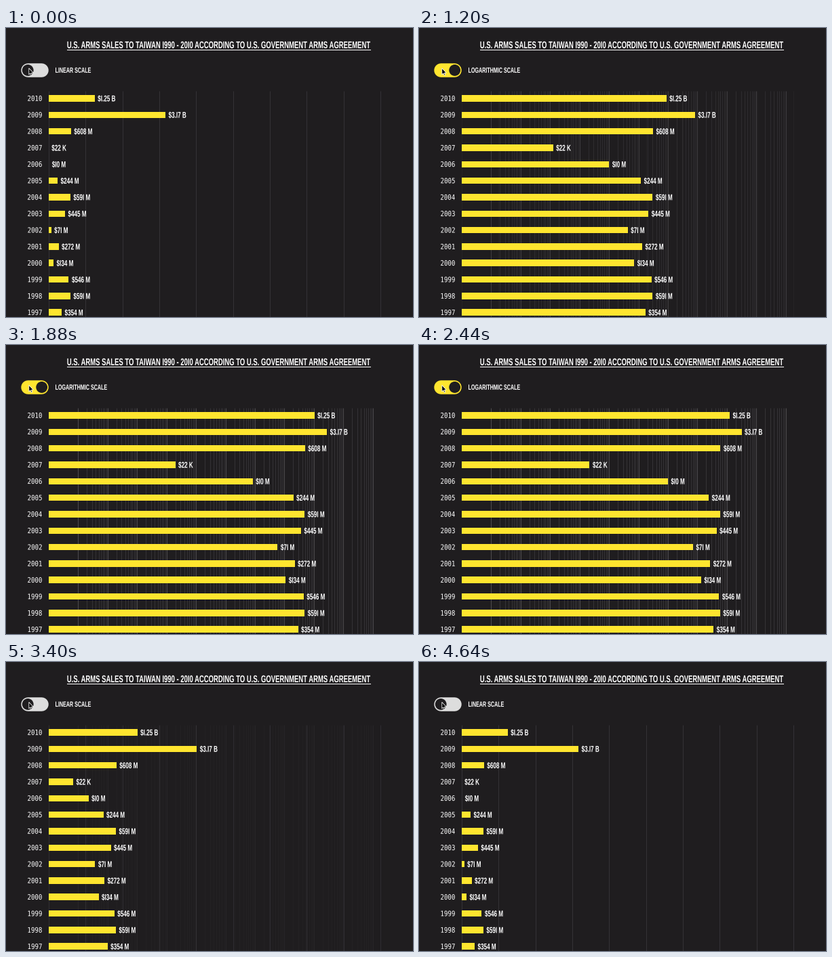
A matplotlib script for the animation above (4.68 s loop, 600 px wide and 427 px high).

```python
import math

import matplotlib.pyplot as plt
import numpy as np
from matplotlib.animation import FuncAnimation
from matplotlib.colors import to_rgb
from matplotlib.patches import Circle, PathPatch, Polygon, Rectangle
from matplotlib.textpath import TextPath
from matplotlib.transforms import Affine2D

W, H, DPI = 600, 427, 64  # a power of two keeps the pixel size exact
INTERVAL, LOOP = 40, 4680
PX = 72 / DPI  # one pixel in points

BG, YELLOW, GREY, WHITE = "#1f1d1f", "#ffe52f", "#dddddd", "#ffffff"
SANS = dict(family="Liberation Sans", weight="bold")
MONO = dict(family="DejaVu Sans Mono")
CONDENSED, SLIM = 0.65, 0.85  # horizontal proportion of the two faces

X0, BILLION, DECADE = 62.8, 54.35, 43.45
TOP, ROW_Y, ROW_STEP, BAR_H = 93, 104, 24.33, 9.6
SALES = [1.25e9, 3.17e9, 608e6, 22e3, 10e6, 244e6, 591e6,
         445e6, 71e6, 272e6, 134e6, 546e6, 591e6, 354e6]

# toggle click, start of the bar motion and its length, in ms
TO_LOG = (640, 672, 1545)
TO_LINEAR = (2740, 2771, 1487)
KNOB_TIME = 200

fig = plt.figure(figsize=(W / DPI, H / DPI), dpi=DPI, facecolor=BG)
ax = fig.add_axes([0, 0, 1, 1])
ax.set_xlim(0, W)
ax.set_ylim(H, 0)
ax.axis("off")


class Lettering:
    """Condensed text centred vertically on y, with ink edges at x."""

    def __init__(self, text, x, y, size, face=SANS, squeeze=CONDENSED, align="left"):
        if face is SANS:
            text = text.replace("1", "I")  # the face draws one as a plain stem
        path = TextPath((0, 0), text, size=size, prop=face)
        box = path.get_extents()
        self.left, self.width = box.x0 * squeeze, box.width * squeeze
        self.squeeze, self.base = squeeze, y + 0.35 * size
        self.shift = {"left": 0, "center": 0.5, "right": 1}[align] * self.width
        self.patch = ax.add_patch(PathPatch(path, fc=WHITE, lw=0, zorder=4))
        self.move(x)

    def move(self, x):
        self.x = x - self.shift
        place = Affine2D().scale(self.squeeze, -1)
        place.translate(self.x - self.left, self.base)
        self.patch.set_transform(place + ax.transData)


def money(value):
    if value >= 1e9:
        return f"${value / 1e9:.2f} B"
    if value >= 1e6:
        return f"${value / 1e6:.0f} M"
    return f"${value / 1e3:.0f} K"


def grid(xs, color):
    lines = ax.vlines(xs, TOP, H, colors=color, linewidth=PX, zorder=1)
    lines.set_snap(True)
    return lines


def clamp(u):
    return min(max(u, 0), 1)


def cubic_out(u):
    return 1 - (1 - clamp(u)) ** 3


def smooth(u):
    u = clamp(u)
    return u * u * (3 - 2 * u)


def mix(a, b, u):
    return a + (b - a) * u


title = Lettering("U.S. ARMS SALES TO TAIWAN 1990 - 2010 ACCORDING TO "
                  "U.S. GOVERNMENT ARMS AGREEMENT",
                  313.7, 24.8, 14.6, align="center")
ax.plot([title.x, title.x + title.width], [31.5, 31.5], color=WHITE, lw=PX)

linear_grid = grid(X0 + BILLION * np.arange(10), "#343236")
minor_grid = grid([X0 + DECADE * (d + math.log10(k))
                   for d in range(1, 11) for k in range(2, 10)], "#353336")
major_grid = grid(X0 + DECADE * np.arange(1, 12), "#4d4b4e")

rows = []
for i, value in enumerate(SALES):
    y = ROW_Y + ROW_STEP * i
    Lettering(str(2010 - i), 52.8, y, 10.7, MONO, SLIM, "right")
    bar = ax.add_patch(Rectangle((X0, y - BAR_H / 2), 0, BAR_H,
                                 fc=YELLOW, lw=0, zorder=3))
    ends = BILLION * value / 1e9, DECADE * math.log10(value)
    rows.append((bar, Lettering(money(value), X0, y, 12.5), ends))

pill, = ax.plot([32.4, 52.4], [62.4, 62.4], lw=20.5 * PX,
                solid_capstyle="round", zorder=3)
knob = ax.add_patch(Circle((32, 62.4), 8.4, fc=BG, lw=0, zorder=4))
ax.add_patch(Polygon([(33.8, 59.3), (33.8, 68.8), (35.9, 66.9), (37.3, 70.2),
                      (38.8, 69.6), (37.4, 66.4), (40.2, 66.2)],
                     fc="black", ec=WHITE, lw=0.8 * PX, zorder=5))
linear_name = Lettering("LINEAR SCALE", 73, 62.2, 11)
log_name = Lettering("LOGARITHMIC SCALE", 73, 62.2, 11)


def draw(frame):
    t = frame * INTERVAL
    back = t >= TO_LINEAR[0]
    click, start, length = TO_LINEAR if back else TO_LOG
    p = cubic_out((t - start) / length)
    k = smooth((t - click) / KNOB_TIME)
    if back:
        p, k = 1 - p, 1 - k

    for bar, label, (linear, log) in rows:
        width = mix(linear, log, p)
        bar.set_width(width)
        label.move(X0 + width + 4.6)

    linear_grid.set_alpha(1 - p)
    minor_grid.set_alpha(p)
    major_grid.set_alpha(p)

    pill.set_color(mix(np.array(to_rgb(GREY)), np.array(to_rgb(YELLOW)), k))
    knob.center = mix(32.2, 52.7, k), 62.4
    is_log = TO_LOG[0] <= t < TO_LINEAR[0]
    linear_name.patch.set_visible(not is_log)
    log_name.patch.set_visible(is_log)
    return []


anim = FuncAnimation(fig, draw, frames=LOOP // INTERVAL, interval=INTERVAL,
                     repeat=True, repeat_delay=0, blit=False)
plt.show()
```
